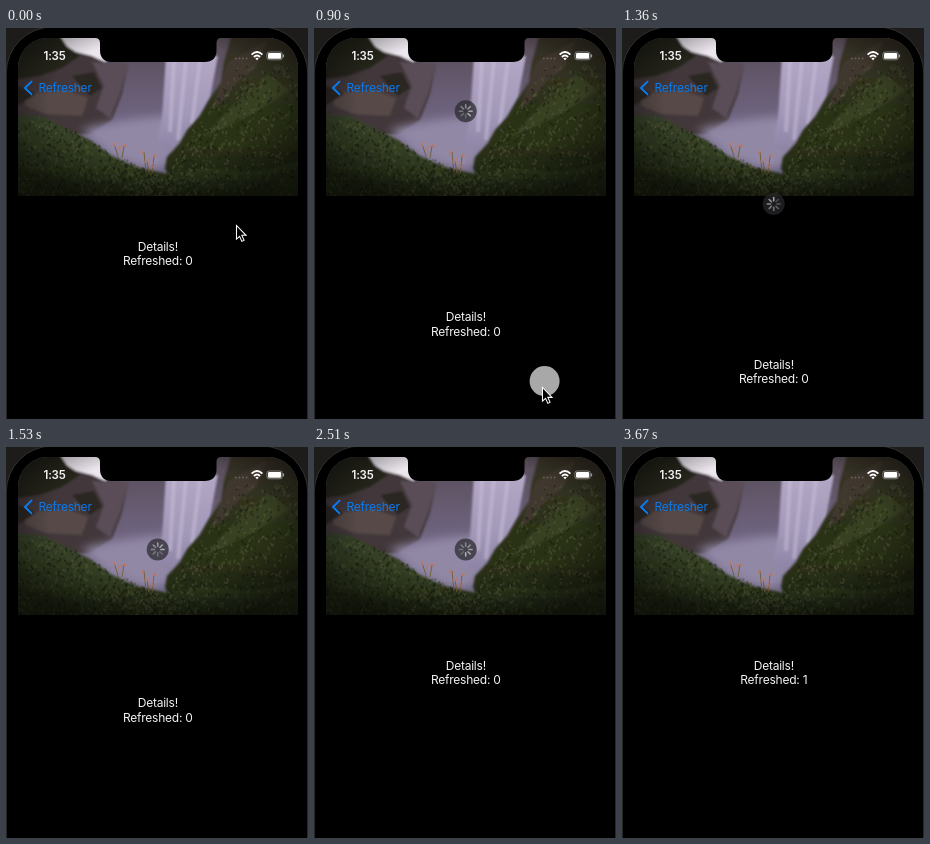
Write an HTML page that moves like this. It is 302x391 px and loops after 4440 ms.

```html
<!DOCTYPE html>
<html lang="en">
<head>
<meta charset="utf-8">
<title>Pull to refresh</title>
<style>
  html, body { margin: 0; width: 100%; height: 100%; overflow: hidden; background: #000; }
  svg { display: block; width: 100vw; height: 100vh; }
  text { font: 12px Inter, "Liberation Sans", sans-serif; letter-spacing: -.23px; fill: #f4f4f4; }
  #label text { text-anchor: middle; }
</style>
</head>
<body>
<svg viewBox="0 0 302 391">
  <defs>
    <clipPath id="screen"><path d="M12 168V40A30 30 0 0 1 42 10H262A30 30 0 0 1 292 40V168Z"/></clipPath>
    <filter id="soft"><feGaussianBlur stdDeviation="1"/></filter>
    <filter id="mist" x="-40%" y="-40%" width="180%" height="180%"><feGaussianBlur stdDeviation="5"/></filter>
    <linearGradient id="haze" x2="0" y2="1">
      <stop stop-color="#574c56"/><stop offset=".5" stop-color="#6f6480"/><stop offset="1" stop-color="#82789a"/>
    </linearGradient>
    <linearGradient id="water" x2="0" y2="1">
      <stop stop-color="#b3a8c5"/><stop offset=".6" stop-color="#a298b8"/><stop offset="1" stop-color="#8d83a4"/>
    </linearGradient>
    <linearGradient id="cliff" x2="0" y2="1">
      <stop stop-color="#39332a"/><stop offset=".45" stop-color="#2c3219"/><stop offset="1" stop-color="#262d16"/>
    </linearGradient>
    <linearGradient id="meadow" x2="0" y2="1">
      <stop stop-color="#37422a"/><stop offset=".6" stop-color="#323d20"/><stop offset="1" stop-color="#222a15"/>
    </linearGradient>
    <radialGradient id="shade" cx=".5" cy=".4" r=".65">
      <stop offset=".6" stop-opacity="0"/><stop offset="1" stop-opacity=".6"/>
    </radialGradient>
  </defs>

  <!-- phone body -->
  <rect width="302" height="391" fill="#1d1c1b"/>
  <rect x=".3" y="-1" width="301.4" height="480" rx="46" fill="#000" stroke="#3c3b3a" stroke-width=".8"/>

  <!-- landscape -->
  <g clip-path="url(#screen)">
    <rect x="12" y="10" width="280" height="158" fill="url(#haze)"/>
    <g filter="url(#soft)">
      <path d="M50 5H100V34L84 28 68 24 58 16Z" fill="#ece7ee"/>
      <path d="M5 5H52L60 18 70 24 86 28 98 34 122 36 116 66 106 92 84 106 5 110Z" fill="#43393a"/>
      <path d="M5 5H52L62 20 74 28 56 40 34 48 5 52Z" fill="#25251b"/>
      <path d="M18 66 60 62 82 70 76 88 40 86 20 78Z" fill="#564a47"/>
      <path d="M86 34 122 36 114 66 104 90 90 80 98 58Z" fill="#5a4e58"/>
      <path d="M66 48 88 44 96 60 84 68ZM8 56 30 66 8 80Z" fill="#2a2524"/>
    </g>
    <path d="M76 102Q110 92 160 88L184 96 170 124 150 144 104 126Z" fill="#9188a6" filter="url(#mist)"/>
    <path d="M160 28H212L204 70 186 100 164 124 150 118 156 90Z" fill="url(#water)" filter="url(#soft)"/>
    <path d="M168 32 164 104M180 32 172 112M194 32 186 96" stroke="#cbc1d9" stroke-width="4" opacity=".5" fill="none" filter="url(#soft)"/>
    <g filter="url(#soft)">
      <path d="M226 5H300V168H170L159 140 161 129 174 115 181 102 194 88 203 72 215 54 218 34Z" fill="url(#cliff)"/>
      <path d="M222 34 262 12 250 40 232 54 216 74 206 80Z" fill="#40372f"/>
      <path d="M262 46 284 62 250 84 222 98 196 110 226 78Z" fill="#374020"/>
      <path d="M5 86 36 88 62 101 84 112 106 128 130 139 162 146 200 140 246 144 300 132V175H5Z" fill="url(#meadow)"/>
    </g>
    <g id="grass" fill="none" stroke-width="1.7"/>
    <path d="M112 128 108 116M116 130 118 118M140 144 138 124M146 146 148 128M143 145 141 133" stroke="#75613f" fill="none"/>
    <g id="flowers" fill="#b8796b"/>
    <rect x="12" y="10" width="280" height="158" fill="url(#shade)"/>
  </g>

  <g id="spinner">
    <circle r="11" fill="#28282b" opacity=".72"/>
    <g id="spokes" stroke="#d0d0d4" stroke-width="1.6" stroke-linecap="round"/>
  </g>

  <!-- notch and bars -->
  <path d="M89 0V10Q94 10 94 15V22Q94 34 106 34H198.500Q210.500 34 210.500 22V15Q210.500 10 215 10V0Z"/>
  <text x="37.5" y="32" style="font-size:11.5px;font-weight:600">1:35</text>
  <path d="M229 30.5h13" stroke="#aaa" stroke-width="1.6" stroke-dasharray="1.6 2" opacity=".4"/>
  <path d="M245.6 26.6Q251 21.6 256.4 26.6M247.9 29Q251 26.2 254.1 29" fill="none" stroke="#fff" stroke-width="1.9"/>
  <path d="M249.3 30.4Q251 29 252.7 30.4L251 32.3Z" fill="#fff"/>
  <rect x="260.9" y="24" width="15.4" height="7.8" rx="2.3" fill="none" stroke="#fff" stroke-opacity=".5" stroke-width=".8"/>
  <rect x="262" y="25.1" width="13.2" height="5.6" rx="1.3" fill="#fff"/>
  <path d="M277.6 26.5v2.8" stroke="#aaa"/>
  <path d="M25.5 53.6 19 60l6.5 6.4" fill="none" stroke="#0a7aec" stroke-width="2" stroke-linecap="round" stroke-linejoin="round"/>
  <text x="32.5" y="64" style="fill:#0a7aec">Refresher</text>

  <g id="label">
    <text x="151.8" y="222.6">Details!</text>
    <text x="151.8" y="237.2" id="count">Refreshed: 0</text>
  </g>

  <g id="cursor">
    <circle id="touch" cx="2.6" cy="-6" r="15" fill="#fff" opacity=".66"/>
    <path d="M.5.5V15L3.8 12 6.2 17.4 8.6 16.3 6.2 11H10.7Z" transform="scale(.94)" stroke="#fff" stroke-width="1.1"/>
  </g>
</svg>
<script>
const LOOP = 4440, RELEASE = 1360, DONE = 3090;
const $ = id => document.getElementById(id);
const clamp = (v, a, b) => Math.min(b, Math.max(a, v));

function add(parent, tag, attrs) {
  const el = document.createElementNS("http://www.w3.org/2000/svg", tag);
  for (const k in attrs) el.setAttribute(k, attrs[k]);
  return parent.appendChild(el);
}

// Tufts of grass and flower heads
let seed = 7;
const rand = () => (seed = seed * 16807 % 2147483647) / 2147483647;
for (const color of ["#4f5a33", "#12160c", "#3f4b26", "#1a2010", "#5d5a40"]) {
  let d = "";
  for (let i = 0; i < 260; i++) {
    const x = 12 + rand() * 280;
    const top = x < 160 ? 88 + Math.max(0, x - 40) * .52 : Math.max(36, 144 - (x - 160) * 1.5);
    const y = top + 3 + rand() * (168 - top);
    d += `M${x.toFixed(1)} ${y.toFixed(1)}l${(rand() * 6 - 3).toFixed(1)} ${(-1 - rand() * 3).toFixed(1)}`;
  }
  add($("grass"), "path", { d, stroke: color, opacity: .5 });
}
for (const [x, y] of [[108, 116], [118, 118], [113, 121], [138, 124], [148, 127], [141, 132], [146, 137]])
  for (let i = 0; i < 3; i++)
    add($("flowers"), "circle", { cx: x + rand() * 4 - 2, cy: y + rand() * 4 - 2, r: 1 });

const spokes = Array.from({ length: 8 }, (_, i) =>
  add($("spokes"), "path", { d: "M0-3.2V-6.4", transform: `rotate(${i * 45})` }));

// Linear interpolation through [time, value] pairs
function track(keys, t) {
  const i = keys.findIndex(k => k[0] > t);
  if (i < 0) return keys[keys.length - 1][1];
  if (!i) return keys[0][1];
  const [t0, a] = keys[i - 1], [t1, b] = keys[i];
  return a + (b - a) * (t - t0) / (t1 - t0);
}
const pull = [[300, 0], [420, 2], [480, 6], [540, 12], [600, 20], [660, 30], [780, 48],
  [900, 71], [960, 82], [1020, 91], [1100, 102], [1200, 111], [1300, 117], [1360, 118]];
const pointer = [[240, 197], [360, 200], [420, 208], [480, 219], [540, 234], [660, 272],
  [780, 311], [840, 334], [900, 360], [1080, 430]];

// Time advances in short even steps between these marks
const marks = [[300, 9], [840, 9], [1360, 10], [1930, 10], [2510, 10], [3090, 9], [3670, 1], [LOOP, 1]];
function step(t) {
  const i = marks.findIndex(m => m[0] > t);
  if (i < 1) return 0;
  const [start, n] = marks[i - 1], gap = (marks[i][0] - start) / n;
  return start + Math.floor((t - start) / gap + 1e-6) * gap;
}

function offset(t) {
  if (t < RELEASE) return track(pull, t);
  const w = (t - RELEASE) * .0138;
  return 118 * (1 + w) * Math.exp(-w);
}

function spinnerY(t, off) {
  const pulled = 176 - 1.957 * (118 - off);
  if (t < RELEASE) return pulled;
  if (t < DONE) return Math.max(102.5, pulled);
  const u = clamp((t - 3040) / 700, 0, 1);
  const ease = u < .5 ? 2 * u * u : 1 - 2 * (1 - u) ** 2;
  return 102.5 - 82.5 * ease;
}

function draw(now) {
  const t = step(now % LOOP), off = offset(t), y = spinnerY(t, off);
  $("label").setAttribute("transform", `translate(0 ${off.toFixed(2)})`);
  $("count").textContent = "Refreshed: " + (t < DONE ? 0 : 1);

  $("spinner").setAttribute("transform", `translate(151.7 ${y.toFixed(2)})`);
  $("spinner").style.display = y > 23 ? "" : "none";
  const lead = Math.floor((t + 90) / 100) + 2;
  spokes.forEach((s, i) => s.setAttribute("opacity", .75 - .07 * ((lead - i + 80) % 8)));

  const x = track([[300, 230], [540, 228]], t);
  $("cursor").setAttribute("transform", `translate(${x} ${track(pointer, t)})`);
  $("cursor").style.display = t < RELEASE ? "" : "none";
  $("touch").style.display = t < 360 ? "none" : "";
}

const begin = performance.now();
function frame() {
  draw(performance.now() - begin);
  requestAnimationFrame(frame);
}
frame();
</script>
</body>
</html>
```
